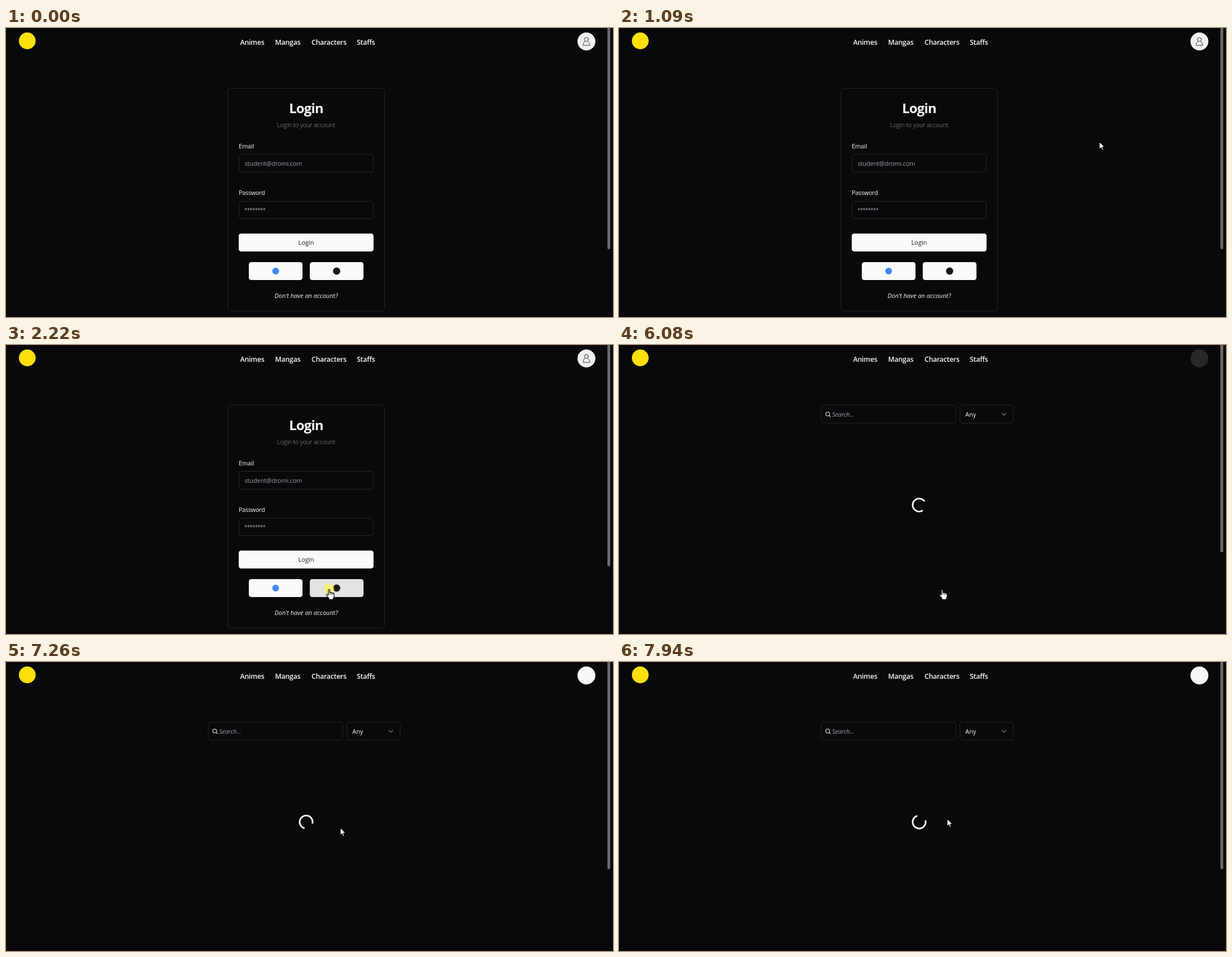
Recreate the animation shown at these times as an HTML page with a canvas. Size 1085 by 516 pixels, loop 8000 ms.

```html
<!DOCTYPE html>
<html lang="en">
<head>
<meta charset="utf-8">
<title>Login</title>
<style>
html, body { margin: 0; width: 100%; height: 100%; overflow: hidden; background: #09090b; }
canvas { display: block; width: 1085px; height: 516px; }
</style>
</head>
<body>
<canvas id="stage" width="1085" height="516"></canvas>
<script>
const ctx = document.getElementById('stage').getContext('2d');
const LOOP = 8000, SWITCH = 6080, AVATAR_AT = 6980;
const BORDER = '#27272a', WHITE = '#fafafa';
const SANS = '"Open Sans", "Noto Sans", sans-serif';

// Pointer keys: time, x, y of the tip
const ENTER = [
  [70, 1023, 488], [210, 968, 400], [350, 915, 318], [490, 878, 268], [670, 850, 242.5],
  [740, 815, 252], [810, 785, 268], [880, 798, 262], [1020, 850, 212], [1120, 869, 181],
  [1190, 853, 178], [1300, 795, 268], [1400, 736, 385], [1510, 688.5, 458], [1580, 645, 457],
  [1650, 600, 451], [1720, 588, 444], [1790, 580, 438], [1860, 577, 436]
];
const LEAVE = [
  [6700, 577, 436], [6840, 588, 413], [6980, 604, 366], [7120, 606, 324], [7255, 597, 294],
  [7390, 606, 288], [7530, 624, 312], [7660, 628, 345], [7730, 570, 344],
  [7800, 516, 318], [7870, 545, 286], [7940, 586, 279]
];

function along(keys, t) {
  const last = keys.length - 1;
  if (t <= keys[0][0]) return keys[0].slice(1);
  if (t >= keys[last][0]) return keys[last].slice(1);
  let i = 0;
  while (t >= keys[i + 1][0]) i++;
  const a = keys[Math.max(i - 1, 0)], b = keys[i], c = keys[i + 1], d = keys[Math.min(i + 2, last)];
  const span = c[0] - b[0], u = (t - b[0]) / span, u2 = u * u, u3 = u2 * u;
  return [1, 2].map(k => {
    const m0 = (c[k] - a[k]) / (c[0] - a[0]) * span;
    const m1 = (d[k] - b[k]) / (d[0] - b[0]) * span;
    return (2 * u3 - 3 * u2 + 1) * b[k] + (u3 - 2 * u2 + u) * m0 + (3 * u2 - 2 * u3) * c[k] + (u3 - u2) * m1;
  });
}

// The screen was sampled at a fixed rate
function sample(t) {
  if (t < SWITCH) return Math.floor(t / 70) * 70;
  return SWITCH + Math.floor((t - SWITCH) / 68.88) * 68.88;
}

function text(str, x, y, { size = 11, weight = 400, style = 'normal', color = WHITE, align = 'left', track = 0, family = SANS } = {}) {
  ctx.font = `${style} ${weight} ${size}px ${family}`;
  ctx.letterSpacing = track + 'px';
  ctx.textAlign = align;
  ctx.fillStyle = color;
  ctx.fillText(str, x, y);
}

function box(x, y, w, h, r, fill, stroke) {
  ctx.beginPath();
  ctx.roundRect(x, y, w, h, r);
  if (fill) { ctx.fillStyle = fill; ctx.fill(); }
  if (stroke) { ctx.strokeStyle = stroke; ctx.lineWidth = 1; ctx.stroke(); }
}

function disc(x, y, r, color) {
  ctx.beginPath();
  ctx.arc(x, y, r, 0, Math.PI * 2);
  ctx.fillStyle = color;
  ctx.fill();
}

function line(path, color, width) {
  ctx.strokeStyle = color;
  ctx.lineWidth = width;
  ctx.lineCap = ctx.lineJoin = 'round';
  ctx.stroke(new Path2D(path));
}

function header() {
  disc(38, 23, 15, '#fde00a');
  const nav = { size: 12.4, weight: 600, track: -0.22 };
  text('Animes', 418.5, 29.5, nav);
  text('Mangas', 481, 29.5, nav);
  text('Characters', 546, 29.5, nav);
  text('Staffs', 627, 29.5, nav);
}

function scrollbar(length) {
  box(1075, -6, 5, length + 6, 2.5, '#6a6a6b');
}

function userIcon() {
  disc(1037.5, 24, 16, '#f0f0f1');
  ctx.beginPath();
  ctx.arc(1037.5, 20.5, 3.6, 0, Math.PI * 2);
  ctx.strokeStyle = '#333336';
  ctx.lineWidth = 1;
  ctx.stroke();
  line('M1034.8 24.2C1032.6 25.6 1031.6 28 1031.6 31H1043.4C1043.4 28 1042.4 25.6 1040.2 24.2', '#333336', 1);
}

function loginPage(t) {
  scrollbar(395);
  userIcon();
  box(396.5, 107.5, 280, 398, 6, null, BORDER);
  text('Login', 536.5, 152, { size: 24, weight: 700, align: 'center', track: -0.8 });
  text('Login to your account', 536.5, 177, { weight: 300, color: '#a1a1aa', align: 'center', track: -0.15 });

  text('Email', 416, 214.5, { track: -0.15 });
  box(416.5, 225.5, 240, 32, 4.5, null, BORDER);
  text('student@dromi.com', 426.5, 245.5, { color: '#a1a1aa', track: -0.13 });
  text('Password', 416, 298, { track: -0.35 });
  box(416.5, 309.5, 240, 31, 4.5, null, BORDER);
  text('********', 426.5, 330, { size: 12, color: '#a1a1aa', family: '"Liberation Sans", Arial, sans-serif' });

  box(416, 367, 241, 32, 4.5, WHITE);
  text('Login', 536.5, 387, { color: '#18181b', align: 'center' });
  box(434, 418, 96, 32, 4.5, WHITE);
  disc(482, 434, 6, '#4285f4');
  const u = Math.min(Math.max((t - 1680) / 150, 0), 1);
  const shade = Math.round(250 - 24 * u * u * (3 - 2 * u));
  box(543, 418, 96, 32, 4.5, `rgb(${shade},${shade},${shade})`);
  disc(591, 434, 6.5, '#18181b');
  text("Don't have an account?", 536.5, 481.5, { style: 'italic', align: 'center' });
}

function searchPage(t) {
  scrollbar(370);
  disc(1037.5, 24, 16, t < AVATAR_AT ? BORDER : '#f7f7f7');
  box(361.5, 107.5, 240.5, 32, 4.5, null, BORDER);
  ctx.beginPath();
  ctx.arc(373, 123.2, 3.5, 0, Math.PI * 2);
  ctx.strokeStyle = '#e4e4e7';
  ctx.lineWidth = 1.1;
  ctx.stroke();
  line('M375.6 125.8L378 128.2', '#e4e4e7', 1.1);
  text('Search...', 381, 128, { style: 'italic', color: '#a1a1aa', track: -0.2 });
  box(609.5, 107.5, 95, 32, 4.5, null, BORDER);
  text('Any', 619, 128);
  line('M684.4 122L688 125.7L691.6 122', '#858589', 1.1);

  const mid = (11 + 0.3485 * (t - SWITCH)) * Math.PI / 180;
  ctx.beginPath();
  ctx.arc(536.5, 285.7, 11.6, mid + Math.PI / 4, mid + Math.PI * 7 / 4);
  ctx.strokeStyle = WHITE;
  ctx.lineWidth = 2.8;
  ctx.lineCap = 'butt';
  ctx.stroke();
}

const ARROW = new Path2D('M0 0V14.2L3.2 11.2L5.3 16L7.6 15L5.5 10.3H9.8Z');
const HAND = new Path2D('M-1.3 .8Q0-.8 1.3 .8V5.5Q2.7 4.4 3.9 5.8Q5.4 5 6.4 6.5Q8.8 5.9 9 8.2V12.5Q8.8 14.5 7.4 16V18H-.2V16.2L-4 11.2Q-5 9.3-3.6 8.7Q-2.5 8.5-1.3 10Z');

function pointer(t) {
  const moving = t < SWITCH || t > 6720;
  const [x, y] = along(t < SWITCH ? ENTER : LEAVE, t);
  const hand = t < SWITCH ? t >= 1720 : !moving;
  ctx.save();
  ctx.translate(Math.round(x) + 0.5, Math.round(y) + 0.5);
  ctx.lineJoin = 'round';
  ctx.lineWidth = 1.2;
  ctx.strokeStyle = '#000';
  ctx.fillStyle = '#fff';
  const shape = hand ? HAND : ARROW;
  ctx.fill(shape);
  ctx.stroke(shape);
  if (hand) line('M1.4 5.5V9M4 6V9.2M6.5 6.8V9.5', '#000', 0.8);
  ctx.restore();
}

function draw(now) {
  const t = sample(now % LOOP);
  ctx.fillStyle = '#09090b';
  ctx.fillRect(0, 0, 1085, 516);
  header();
  if (t < SWITCH) loginPage(t);
  else searchPage(t);
  // Click highlight
  if (t >= 2030 && t < 2200) disc(577.5, 435.5, 9.5, 'rgba(255,255,0,.47)');
  if (t >= 70) pointer(t);
}

const start = performance.now();
function tick() {
  draw(performance.now() - start);
  requestAnimationFrame(tick);
}
tick();
</script>
</body>
</html>
```
